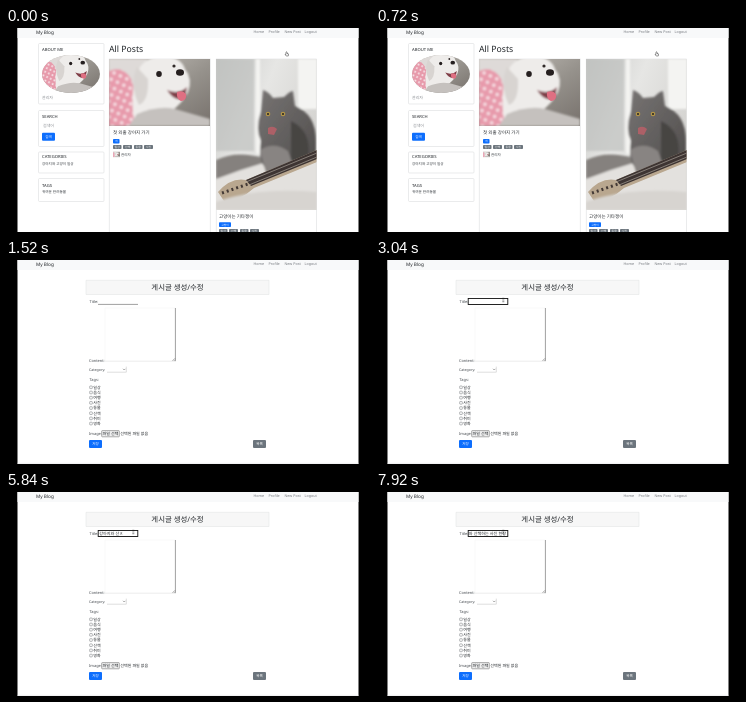
Write an HTML page that moves like this. It is 364x204 px and loops after 8000 ms.

```html
<!DOCTYPE html>
<html>
<head>
<meta charset="utf-8">
<title>My Blog</title>
<style>
html, body { margin: 0; width: 100%; height: 100%; overflow: hidden; background: #000; }
svg { display: block; width: 100vw; height: 100vh; }
text { font: 4px "Noto Sans", "Noto Sans CJK KR", "Noto Sans CJK", sans-serif; fill: #212529; text-rendering: geometricPrecision; white-space: pre; }
.h { font-size: 4.2px; }
.muted { fill: #8b8f94; }
.nav { font-size: 3.7px; fill: #777b80; }
.small { font-size: 3.6px; fill: #33383d; }
.label { font-size: 3.9px; fill: #44494e; }
.on { fill: #fff; font-size: 3.6px; text-anchor: middle; }
.tiny { fill: #fff; font-size: 2.8px; text-anchor: middle; }
.card { fill: #fff; stroke: #dcdee0; stroke-width: .6; }
.blue { fill: #0d6efd; }
.gray { fill: #6c757d; }
.box { fill: #fff; stroke: #6f7377; stroke-width: .5; }

#list { animation: list 8s step-end infinite; }
#form { animation: form 8s step-end infinite; }
#tap { animation: tap 8s step-end infinite; }
#focus { animation: focus 8s step-end infinite; }
#arrow { animation: arrow 8s infinite; }
#arrow path { animation: pointer 8s step-end infinite; }
#hand { animation: hand 8s step-end infinite; }
#beam { animation: beam 8s step-end infinite; }
@keyframes list { 0% { visibility: visible } 19%, 100% { visibility: hidden } }
@keyframes form { 0% { visibility: hidden } 19%, 100% { visibility: visible } }
@keyframes tap { 0% { visibility: hidden } 18% { visibility: visible } 19%, 100% { visibility: hidden } }
@keyframes focus { 0% { visibility: hidden } 31%, 100% { visibility: visible } }
@keyframes arrow {
  0%, 11% { transform: translate(280px, 24px) }
  14%, 20% { transform: translate(288px, 6px); animation-timing-function: ease-in-out }
  28%, 100% { transform: translate(128px, 40px) }
}
@keyframes pointer { 0% { visibility: visible } 14% { visibility: hidden } 20.5% { visibility: visible } 28%, 100% { visibility: hidden } }
@keyframes hand { 0% { visibility: hidden } 14% { visibility: visible } 20.5%, 100% { visibility: hidden } }
@keyframes beam {
  0% { visibility: hidden; transform: translate(128.3px, 40px) }
  28% { visibility: visible; transform: translate(128.3px, 40px) }
  33%, 100% { visibility: visible; transform: translate(127.3px, 40px) }
}
</style>
</head>
<body>
<svg viewBox="0 0 364 204" preserveAspectRatio="none">
  <defs>
    <linearGradient id="room" x1="0" y1="0" x2="1" y2="1">
      <stop offset="0" stop-color="#c9c5bf"/><stop offset=".55" stop-color="#96928c"/><stop offset="1" stop-color="#77716c"/>
    </linearGradient>
    <linearGradient id="wall" x1="0" y1="0" x2="1" y2=".6">
      <stop offset="0" stop-color="#c9cac8"/><stop offset=".45" stop-color="#e6e6e4"/><stop offset="1" stop-color="#d2d1ce"/>
    </linearGradient>
    <linearGradient id="fur" x1="0" y1="0" x2="1" y2="1">
      <stop offset="0" stop-color="#777473"/><stop offset="1" stop-color="#4f4c4b"/>
    </linearGradient>
    <pattern id="dots" width="7" height="7" patternUnits="userSpaceOnUse" patternTransform="rotate(25)">
      <rect width="7" height="7" fill="#e79aab"/><circle cx="3.5" cy="3.5" r="1.7" fill="#f8e6ea"/>
    </pattern>
    <filter id="soft"><feGaussianBlur stdDeviation=".9"/></filter>
    <clipPath id="dogClip"><rect width="101" height="67"/></clipPath>
    <clipPath id="catClip"><rect width="100.5" height="151"/></clipPath>
    <clipPath id="oval"><ellipse cx="65" cy="46" rx="29" ry="19"/></clipPath>
    <clipPath id="field"><rect x="92.6" y="38.5" width="38.8" height="6"/></clipPath>
    <g id="dog" clip-path="url(#dogClip)">
      <rect width="101" height="67" fill="url(#room)"/>
      <g filter="url(#soft)">
        <path d="M0 0H38L30 67H0Z" fill="#dedad8"/>
        <path d="M0 12Q14 6 22 20L32 50 20 67H0Z" fill="url(#dots)"/>
        <path d="M26 67Q20 36 28 14 34-2 54-3 72-2 76 10 84 20 79 33 72 46 62 52L58 67Z" fill="#eeecea"/>
        <path d="M28 8Q20 26 30 46 40 42 39 20Z" fill="#d8d4d1"/>
        <path d="M28 55Q50 46 66 50L101 60V67H20Z" fill="#c5c1be"/>
        <path d="M58 31Q70 36 78 28L76 39Q66 44 58 31Z" fill="#803f48"/>
      </g>
      <path d="M68 33Q74 31 77 35 78 42 72 42 67 40 68 33Z" fill="#df6f82"/>
      <ellipse cx="50" cy="15" rx="2.8" ry="3" fill="#251f1f"/>
      <ellipse cx="71" cy="13.5" rx="4" ry="3.3" fill="#251f1f"/>
      <circle cx="65" cy="7" r="1.6" fill="#302a29"/>
    </g>
    <g id="cat" clip-path="url(#catClip)">
      <rect width="101" height="151" fill="url(#wall)"/>
      <g filter="url(#soft)">
        <path d="M0 0H38V92H0Z" fill="#bebfbd" opacity=".65"/>
        <path d="M40 0H44V95H40ZM82 0H101V50H82Z" fill="#f4f4f2"/>
        <path d="M0 101Q20 91 48 99L46 118 0 126Z" fill="#85817e"/>
        <path d="M0 120Q48 101 101 92V151H0Z" fill="#e3e1de"/>
        <path d="M47 31Q53 33 57 39L68 38Q74 32 77 32L79 47Q100 55 100 82V101L54 112Q41 106 45 82 39 70 45 52Z" fill="url(#fur)"/>
        <path d="M75 62Q96 72 92 98L75 102Z" fill="#474443"/>
        <path d="M44 91Q58 82 72 92L77 106 50 114Z" fill="#888482"/>
      </g>
      <circle cx="52" cy="55" r="2.3" fill="#b39546"/><circle cx="67" cy="55" r="2.3" fill="#b39546"/>
      <circle cx="52" cy="55" r="1" fill="#222"/><circle cx="67" cy="55" r="1" fill="#222"/>
      <path d="M52 69Q57 66 61 70L58 76 52 75Z" fill="#ad6067"/>
      <path d="M2 133Q15 118 30 121L101 91V103L38 129Q24 142 8 142Z" fill="#b9a78f"/>
      <path d="M30 121L101 91V100L35 127Z" fill="#3d3432"/>
      <path d="M30 123L101 94M33 126L101 98" stroke="#b8b0a7" stroke-width=".6"/>
      <path d="M6 134L32 125" stroke="#443a36" stroke-width="3" stroke-dasharray="2 3"/>
      <path d="M0 143Q40 128 101 133V151H0Z" fill="#d7d4d0" filter="url(#soft)"/>
    </g>
    <g id="tags">
      <rect class="gray" width="8.5" height="4" rx=".8"/><rect class="gray" x="10" width="9" height="4" rx=".8"/>
      <rect class="gray" x="21" width="8.5" height="4" rx=".8"/><rect class="gray" x="31" width="9" height="4" rx=".8"/>
      <text class="tiny" x="4.2" y="3.1">일상</text><text class="tiny" x="14.5" y="3.1">산책</text>
      <text class="tiny" x="25.2" y="3.1">동물</text><text class="tiny" x="35.5" y="3.1">사진</text>
    </g>
  </defs>

  <rect width="364" height="204"/>
  <rect x="11.5" width="341" height="204" fill="#fff"/>
  <rect x="11.5" width="341" height="10" fill="#f8f9fa"/>
  <text x="30" y="5.8" style="font-size:4.7px">My Blog</text>
  <text class="nav" x="247.5" y="5.3">Home</text>
  <text class="nav" x="262.5" y="5.3">Profile</text>
  <text class="nav" x="278.5" y="5.3">New Post</text>
  <text class="nav" x="298.5" y="5.3">Logout</text>

  <g id="list">
    <text x="103" y="24.3" style="font-size:8.7px">All Posts</text>
    <rect class="card" x="32.5" y="15.5" width="65.5" height="60.5" rx="1"/>
    <text class="h" x="36" y="23.4">ABOUT ME</text>
    <g clip-path="url(#oval)"><use href="#dog" transform="translate(36 27) scale(.574 .567)"/></g>
    <text class="muted" x="36" y="70.7">관리자</text>

    <rect class="card" x="32.5" y="82.5" width="65.5" height="36" rx="1"/>
    <text class="h" x="36" y="90.2">SEARCH</text>
    <text class="muted" x="37" y="99">검색어</text>
    <rect class="blue" x="36" y="104.8" width="13" height="8" rx="1"/>
    <text class="on" x="42.5" y="110.2">검색</text>

    <rect class="card" x="32.5" y="124" width="65.5" height="21" rx="1"/>
    <text class="h" x="36" y="130.3">CATEGORIES</text>
    <text class="small" x="36" y="137">강아지와 고양이 일상</text>

    <rect class="card" x="32.5" y="150.5" width="65.5" height="23" rx="1"/>
    <text class="h" x="36" y="158.6">TAGS</text>
    <text class="small" x="36" y="165.4">귀여운 반려동물</text>

    <rect class="card" x="103.2" y="31" width="101" height="180"/>
    <use href="#dog" x="103" y="31"/>
    <text x="107" y="106.3" style="font-size:4.5px">첫 외출 강아지 가기</text>
    <rect class="blue" x="107" y="111" width="6.5" height="4.5" rx=".8"/>
    <text class="tiny" x="110.2" y="114.3">개</text>
    <use href="#tags" x="107" y="117"/>
    <use href="#dog" transform="translate(107 123.5) scale(.07 .085)"/>
    <text class="small" x="115" y="128">관리자</text>

    <rect class="card" x="210.2" y="31" width="100.3" height="180"/>
    <use href="#cat" x="210" y="31"/>
    <text x="213" y="190" style="font-size:4.5px">고양이는 기타쟁이</text>
    <rect class="blue" x="213" y="194.3" width="12" height="4.7" rx=".8"/>
    <text class="tiny" x="219" y="197.7">고양이</text>
    <use href="#tags" x="213" y="201"/>

    <g id="tap">
      <rect class="blue" x="276.7" y="0" width="18.6" height="9"/>
      <text class="nav" x="278.5" y="5.3" style="fill:#164b9f">New Post</text>
    </g>
  </g>

  <g id="form">
    <rect x="80" y="20.3" width="183" height="14.2" fill="#f7f7f7"/>
    <path d="M80 34.5V20.3H263V34.5Z" fill="none" stroke="#dfe0e1" stroke-width=".5"/>
    <text x="171.5" y="29.5" text-anchor="middle" style="font-size:7.4px">게시글 생성/수정</text>

    <text class="label" x="83.5" y="43.2">Title:</text>
    <path d="M92 44.4H132" stroke="#777" stroke-width=".7"/>
    <rect id="focus" x="92.2" y="38.5" width="39.6" height="6" fill="#fff" stroke="#111" stroke-width=".9"/>
    <g clip-path="url(#field)"><text id="typed" y="43" style="font-size:4.1px"></text></g>

    <path d="M99 101V48H169.5" fill="none" stroke="#f1f1f1" stroke-width=".5"/>
    <path d="M169.4 48V101.2" stroke="#777" stroke-width=".7"/>
    <path d="M99 101.2H169" stroke="#d9d9d9" stroke-width=".5"/>
    <path d="M166.5 100.8L169 98.3M168 100.8L169 99.8" stroke="#555" stroke-width=".5"/>
    <text class="label muted" x="83" y="102">Content:</text>

    <text class="label" x="83" y="111" style="font-size:3.6px">Category:</text>
    <path d="M120.3 106.6V112.2H101" fill="none" stroke="#bbb" stroke-width=".5"/>
    <path d="M117 108.8L118.2 110 119.4 108.8" fill="none" stroke="#555" stroke-width=".5"/>
    <text class="label" x="83.5" y="120.8">Tags:</text>
    <g id="checks"></g>

    <text class="label" x="83" y="175">Image:</text>
    <rect x="95.7" y="170.6" width="17.6" height="6.2" rx=".6" fill="#efefef" stroke="#777" stroke-width=".6"/>
    <text x="104.5" y="175" text-anchor="middle">파일 선택</text>
    <text x="114.3" y="175">선택된 파일 없음</text>
    <rect class="blue" x="83" y="180" width="13" height="8" rx="1"/>
    <text class="on" x="89.5" y="185.4">저장</text>
    <rect class="gray" x="247" y="180" width="13" height="8" rx="1"/>
    <text class="on" x="253.5" y="185.4">목록</text>
    <path d="M11.5 203.3H352.5" stroke="#e4e5e6" stroke-width=".6"/>
  </g>

  <g id="arrow">
    <path d="M0 0V3.2L.8 2.5 1.4 3.7 1.9 3.4 1.3 2.3H2.3Z" fill="#222" stroke="#fff" stroke-width=".25"/>
    <g id="hand"><path d="M0 0Q.7-.6 1.1 .2V1.5L2.5 1.9 2.3 4H.2L-1 2.2 0 2.3Z" fill="#fff" stroke="#222" stroke-width=".45"/></g>
  </g>
  <path id="beam" d="M-.8-1.8H.8M0-1.8V1.8M-.8 1.8H.8" stroke="#222" stroke-width=".5"/>
</svg>
<script>
const LOOP = 8000, LEFT = 93.3, RIGHT = 131;
const typed = document.getElementById("typed");

document.getElementById("checks").innerHTML =
  "일상 음식 여행 사진 동물 산책 취미 영화".split(" ").map((name, i) => {
    const y = 126 + i * 5.18;
    return `<rect class="box" x="83.7" y="${y}" width="2.6" height="2.6" rx=".4"/>
      <text x="87.3" y="${y + 2.7}">${name}</text>`;
  }).join("");

// [start of a burst of keys, text kept, compositions at 80 ms intervals]
const bursts = [
  [4320, "", "ㄱ"], [4480, "", "가"], [4640, "", "강|강ㅇ"],
  [4880, "강", "아|아ㅈ"], [5120, "강아", "지|지ㅇ|지오|지와"],
  [5520, "강아지와 ", "ㅅ"], [5680, "강아지와 ", "사|산|산ㅊ"],
  [6080, "강아지와 산", "채|책|책ㅎ|책하"], [6480, "강아지와 산책하", "ㄴ|느"],
  [6720, "강아지와 산책하", "는|는 ㅅ|는 사|는 사ㅈ|는 사지|는 사진|는 사진 |는 사진 ㅎ|는 사진 하|는 사진 한"],
  [7680, "강아지와 산책하는 사진 한", "ㅈ|자|장|장 "]
];

function textAt(time) {
  const burst = bursts.findLast(([start]) => start <= time);
  if (!burst) return "";
  const [start, kept, keys] = burst, steps = keys.split("|");
  return kept + steps[Math.min(steps.length - 1, Math.floor((time - start) / 80))];
}

let origin;
function draw(now) {
  origin ??= now;
  const text = textAt((now - origin) % LOOP);
  if (typed.textContent !== text) {
    typed.textContent = text;
    typed.setAttribute("x", Math.min(LEFT, RIGHT - typed.getComputedTextLength()));
  }
  requestAnimationFrame(draw);
}
requestAnimationFrame(draw);
</script>
</body>
</html>
```
